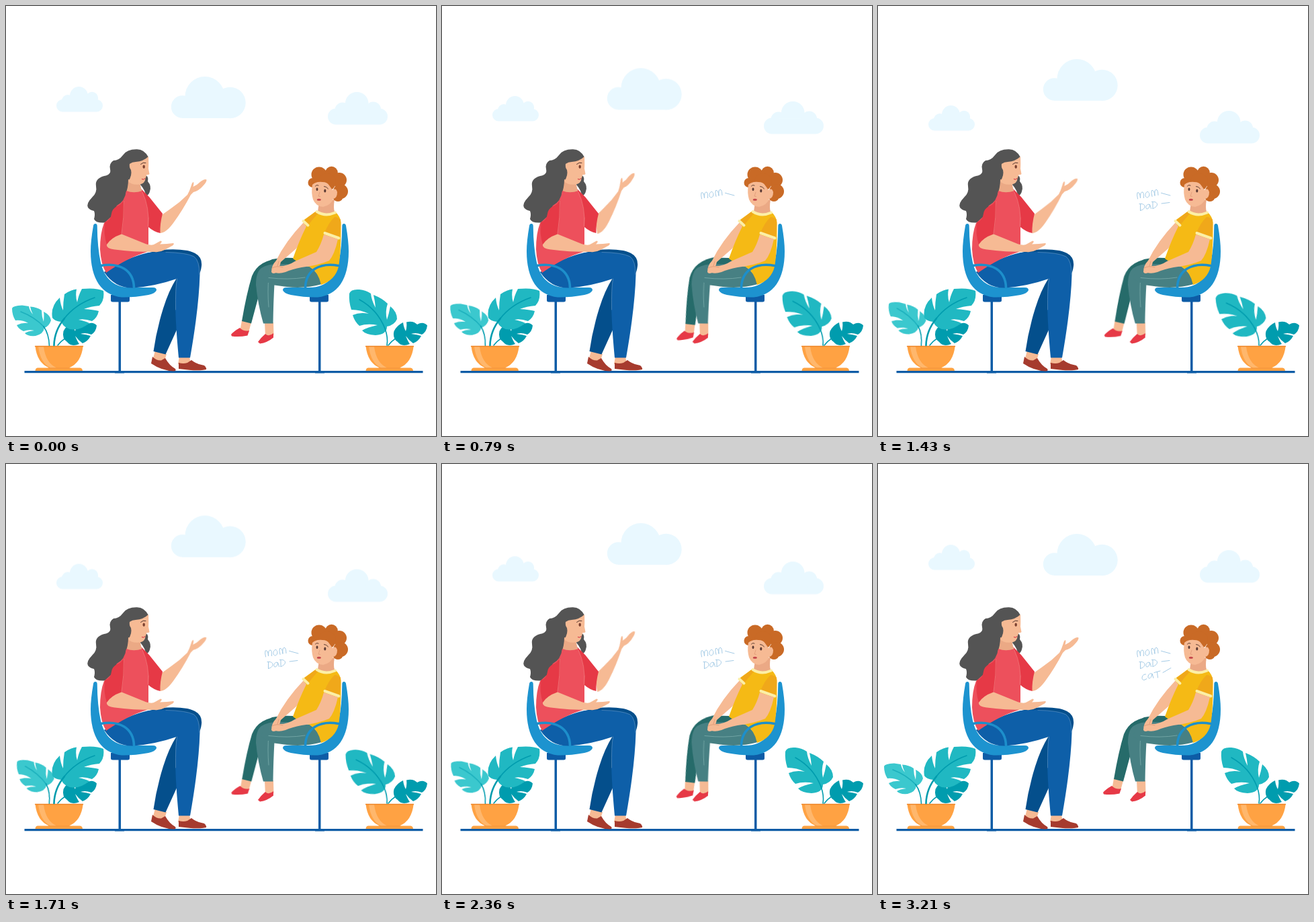
Animation of 640x640 px, one loop 3280 ms. Source, as an HTML page without scripts:

```html
<!DOCTYPE html>
<html lang="en">
<head>
<meta charset="utf-8">
<title>Talking together</title>
<style>
html, body { margin: 0; height: 100%; overflow: hidden; background: #fff; }
svg { display: block; width: 100vw; height: 100vh; }

.sink, .rise, .arm, .shin, .foot, .sway, .bend, .word {
  animation: 3280ms linear infinite;
}
.sink { animation-name: sink; }
.rise { animation-name: rise; }
.sway { animation-name: sway; transform-origin: 65px 505px; }
.bend { animation-name: bend; transform-origin: 567px 505px; }
.arm, .shin, .foot {
  animation-name: swing;
  animation-timing-function: cubic-bezier(.37, 0, .63, 1);
}
.arm { --a: -9.6deg; transform-origin: 236px 325px; }
.shin { --a: -7.6deg; transform-origin: 388px 385px; }
.foot { --a: 1.2deg; transform-origin: 386px 390px; }
.word { animation-timing-function: step-end; }
.w1 { animation-name: w1; }
.w2 { animation-name: w2; }
.w3 { animation-name: w3; }

@keyframes sink {
  0%, 100% { transform: translateY(0); }
  8.7% { transform: translateY(1.5px); }
  17.4% { transform: translateY(6px); }
  25% { transform: translateY(15px); }
  32.6% { transform: translateY(23px); }
  43.6% { transform: translateY(28px); }
  51.2% { transform: translateY(29px); }
  61% { transform: translateY(25px); }
  85.1% { transform: translateY(8px); }
  97.9% { transform: translateY(.2px); }
}
@keyframes rise {
  0%, 100% { transform: translateY(0); }
  17.4% { transform: translateY(-8px); }
  32.6% { transform: translateY(-18.3px); }
  43.6% { transform: translateY(-26px); }
  51.2%, 53.5% { transform: translateY(-28.3px); }
  61% { transform: translateY(-24px); }
  72% { transform: translateY(-17px); }
  85.1% { transform: translateY(-8px); }
  97.9% { transform: translateY(-1px); }
}
@keyframes swing {
  0%, 49.5%, 97.9%, 100% { transform: rotate(0); }
  24.7%, 75% { transform: rotate(var(--a)); }
}
@keyframes sway {
  0%, 97.9%, 100% { transform: rotate(0); }
  17.4% { transform: rotate(1.7deg); }
  32.6% { transform: rotate(5.6deg); }
  43.6%, 61% { transform: rotate(7deg); }
  51.2% { transform: rotate(7.3deg); }
  72% { transform: rotate(4.5deg); }
  85.1% { transform: rotate(1.6deg); }
}
@keyframes bend {
  0%, 66%, 100% { transform: rotate(0); }
  17.4% { transform: rotate(-1.6deg); }
  32.6% { transform: rotate(-5.5deg); }
  43.6%, 46% { transform: rotate(-6.6deg); }
  61% { transform: rotate(-.9deg); }
}
@keyframes w1 { 0% { opacity: 0; } 8.5%, 100% { opacity: 1; } }
@keyframes w2 { 0% { opacity: 0; } 38.4%, 100% { opacity: 1; } }
@keyframes w3 { 0% { opacity: 0; } 72.6%, 100% { opacity: 1; } }

.sky { fill: #e9f8ff; }
.skin { fill: #f6ba94; }
.neck { fill: #eba985; }
.hair { fill: #545454; }
.chair { fill: #1d93cf; }
.navy { fill: #0d5ca6; }
.red { fill: #ed505c; }
.crimson { fill: #e63946; }
.denim { fill: #0e5fa8; }
.shade { fill: #044f8c; }
.brown { fill: #a63b2e; }
.ginger { fill: #c96a26; }
.yellow { fill: #f5ba15; }
.amber { fill: #f0a81a; }
.moss { fill: #478083; }
.pine { fill: #266b6a; }
.leaf { fill: #20b8c2; }
.mint { fill: #3bc8ce; }
.teal { fill: #009cae; }
.line { fill: none; stroke-linecap: round; stroke-linejoin: round; }
.stem { stroke: #009cae; stroke-width: 1.6; }
.ink { stroke: #a3cae5; stroke-width: 1; }
.face { stroke: #5a3a30; stroke-width: 1; }
</style>
</head>
<body>
<svg viewBox="0 0 640 640">
  <defs>
    <g id="cloud" class="sky">
      <rect y="19" width="69" height="18.5" rx="9.2"/>
      <circle cx="17" cy="21" r="9"/>
      <circle cx="33.5" cy="13.5" r="13.5"/>
      <rect x="17" y="20" width="36" height="14"/>
    </g>
    <g id="seat">
      <path class="navy" d="M156 430H184V438Q184 440.500 181 440.500H159Q156 440.500 156 438ZM167.500 438H171V544H167.500ZM162 543H176V546.600H162Z"/>
      <path class="chair" d="M130 327Q130.500 324 133 324Q135.500 324 135.700 327Q136 360 141 382Q147 408 167 416Q174 419 185 419H219Q224 419 224 423Q222 428 212 430Q190 434 172 433.500Q150 431 138 414Q126 396 126 365Q126 350 130 327Z"/>
    </g>
    <path id="rest" class="line" stroke="#1d8fcb" stroke-width="3.6" d="M141 386.500Q162 382.500 176 391Q190 400 190.500 419"/>
    <g id="pot">
      <path class="line stem" d="M77 505Q86 493 104 487Q118 480 130 476"/>
      <path class="teal" d="M135 475.500Q134 485 127 489Q118 485.500 111 488Q120 489 126 491Q122 499 114 502Q107 497 103 491Q106 499 109 503Q97 508 91 500Q83 495 85.500 484Q90 475 99 471Q100 479 103 484Q105 477 104 470.500Q114 468 120 474Q129 469 135 475.500Z"/>
      <path fill="#ffa243" d="M43.500 506H114.700Q112 531 94 538.500H110Q114 539 114 543.500H43.500Q43.500 539 47 538.500H64Q46 531 43.500 506Z"/>
      <path fill="#ffb76c" d="M48 507H56Q59 531 75 538.500H66Q51 531 48 507Z"/>
      <path class="line" stroke="#ee8425" stroke-width="1.300" d="M43.500 506.500H114.500"/>
      <path class="line" stroke="#f39035" stroke-width=".8" d="M63 539H95"/>
    </g>
  </defs>

  <!-- sky -->
  <g class="sink sky">
    <use href="#cloud" x="75" y="120"/>
    <circle cx="128" cy="137" r="9.200"/>
    <use href="#cloud" transform="translate(479 128) scale(1.29)"/>
    <circle cx="546.500" cy="154" r="11.500"/>
  </g>
  <g class="rise sky">
    <circle cx="262.500" cy="150" r="16.700"/>
    <circle cx="296" cy="134.500" r="29.500"/>
    <circle cx="333.500" cy="144" r="23.200"/>
    <rect x="262" y="138" width="72" height="29"/>
  </g>

  <!-- plants -->
  <g class="sway">
    <path class="mint" d="M9 450Q10 446 24 445.500L34 447Q35 453 40 459Q37 453 36 447.500Q46 448 53 453Q53 462 56 470Q57 460 56 455Q66 460 67 468Q64 477 57 479Q56 488 44 491Q32 492 28 487Q32 484 42 483Q34 481 26 484Q19 481 16 475Q24 471 33 472Q24 467 14 468Q9 460 9 450Z"/>
    <path class="line stem" stroke-opacity=".55" d="M22 455Q43 463 57 478"/>
    <path class="line stem" d="M56 477Q64 488 64.500 506"/>
  </g>
  <use href="#pot"/>
  <path class="leaf" d="M145 424Q147 438 139 446Q126 447 116 451Q130 452 138 454Q136 464 128 469Q116 465 108 467Q118 469 124 472Q112 482 100 481.500Q87 481 82 470Q72 469 69 464Q66 447 80 434Q81 445 85 453Q85 440 87 429Q97 422 105 421.500Q103 432 106 441Q108 430 113 421Q135 419 145 424Z"/>
  <path class="line stem" d="M132 434Q103 444 86 466"/>
  <path class="line stem" style="stroke-width:2.600" d="M87 465Q72 483 71.500 505"/>
  <use href="#pot" x="492"/>
  <g class="bend">
    <path class="leaf" d="M511 428Q513 421 526 422Q536 423 543 428Q544 438 550 449Q549 438 547 430Q560 435 568 443Q564 455 567 467Q570 458 572 447Q582 455 582 466Q578 475 567 477Q567 489 550 490Q535 489 530 483Q538 478 553 475Q538 472 526 476Q519 470 516 460Q527 455 540 458Q528 452 514 452Q510 440 511 428Z"/>
    <path class="line stem" d="M526 437Q553 452 564 480Q569 494 567 505"/>
  </g>

  <!-- floor and chairs -->
  <rect class="navy" x="27.500" y="543" width="593" height="3.200"/>
  <use href="#seat"/>
  <use href="#seat" transform="matrix(-1 0 0 1 636 0)"/>

  <!-- mother -->
  <g>
    <path class="skin" d="M222 513L239 518L235 531L218 528Z"/>
    <path class="brown" d="M218 522Q224 528 231 527.500L237 524Q243 535 252 540Q254 543 250 543.500Q232 543 216 532Z"/>
    <path class="shade" d="M210 368Q240 359 270 364Q293 369 291 387Q290 396 286 402L262 440L255 480L237.500 518.500L219.500 514Q224 482 234 450Q242 424 254 405Z"/>
    <path class="skin" d="M258 522H273L275 533H256Z"/>
    <path class="brown" d="M257 531Q264 533 270 531L276 527Q283 533 295 535Q299 538 298 541Q290 543 275 542L257 540Z"/>
    <path class="denim" d="M146 396Q180 374 212 367Q255 364 277 371Q289 376 288.500 400Q287 450 274 523.500H257Q252 470 252 440Q252 420 254 406Q222 417 190 419.500Q163 421 146 396Z"/>
    <path class="line" stroke="#6796c0" stroke-width=".6" d="M238 366.500Q268 367 280 373Q288 379 288 400M252.500 452Q252 420 254.500 406"/>

    <path class="hair" d="M212 225Q206 213.500 195 213.300Q180 213 174 222Q168 230 160 230Q153 234 155 243Q157 251 146 253Q132 257 134 268Q136 278 128 285Q119 294 122 300Q125 304 131 305Q133 310 131 317Q133 323 146 322.500L160 318L170 302L182 290L192 262V240Z"/>
    <path class="neck" d="M182 258L199 262L203 280H178Q182 270 182 258Z"/>
    <path class="hair" d="M205 251Q213 252 211 261Q217 268 214 276Q213 281 208 283.500Q208 275 200 266Z"/>
    <path class="skin" d="M184 235Q188 232 193 232Q205 231 212 224Q212.500 236 212 242L213.500 250Q212 252 209.500 251L207.500 257Q207 264 199 265.500Q187 267 182 261Q188 252 186 244Q183 240 184 235Z"/>
    <ellipse cx="205.200" cy="239.200" rx="1.700" ry="2.700" fill="#7a4030"/>
    <path class="line face" d="M200.500 235.500Q204 232 208 233.500"/>
    <path class="line" stroke="#d8434c" stroke-width="1.200" d="M202.500 257.500Q205 259 207 256.500"/>

    <g class="arm">
      <path class="skin" d="M229 313Q245 302 258 292L270 281Q273 276 275.500 268Q277 262 279 262Q280 264 278.500 269Q285 266 290 261Q296 257 298.500 258.500Q299 262 293 268Q287 275 279 277L275 281Q263 304 249 323Q238 338 229 338Z"/>
    </g>
    <path class="red" d="M179 275Q190 279.500 203 275Q212 285 212 300V354L210 366Q182 374 149 397Q141 384 140 362Q140 338 146 323L156 314L165 297Q177 291 179 275Z"/>
    <path class="crimson" d="M201 272L213 284L233 309Q229 324 229.500 338Q220 336 212 329Q214 300 201 272Z"/>
    <path class="crimson" d="M176 288Q177 310 172 340Q158 345 150 355Q145 340 147 322Q156 319 157 309Q158 302 165 298Q172 296 176 288Z"/>
    <path class="line" stroke="#f18a8a" stroke-width=".6" d="M175.500 290Q176 314 172 339M203 277Q214 300 211.500 328"/>
    <path class="skin" d="M150 355Q156 345 172 339.500L209 354.500Q218 357 222 354L230 349.500Q234 350 229 354.500Q240 354 249 353Q251 354 248 356.500L236 363Q229 367 221 366Q188 366 162 362.500Q149 361 150 355Z"/>
  </g>
  <use href="#rest"/>

  <!-- boy -->
  <g class="shin">
    <path class="skin" d="M351 468L365 471L361 486L348 485Z"/>
    <path class="crimson" d="M335 489Q339 484 348 479Q354 485 362 483L359.500 490.500Q347 493 336 491.500Z"/>
    <path class="pine" d="M410 376Q376 377 366 402Q358 428 351 469L365 472.500L377 428L395 400Z"/>
  </g>
  <path class="pine" d="M396 377Q415 373 436 376L446 390L385 402L378 388Z"/>
  <g class="foot">
    <path class="skin" d="M385 471H398L398.500 490L386 491Z"/>
    <path class="crimson" d="M375 500Q380 493 386 488Q391 493 398 487L398 493.500Q389 501 378 502.500Z"/>
    <path class="moss" d="M430 386Q396 380 380 390Q372 396 372 415Q375 445 383 472.500H397.500Q398 440 399.500 414L430 400Z"/>
    <path class="line" stroke="#83b3b2" stroke-width=".7" d="M391 448Q389 425 391 404"/>
  </g>
  <path class="moss" d="M384 389Q410 380 452 388Q466 397 470 414Q445 421 418 418L396 415L380 406Z"/>
  <path class="line" stroke="#83b3b2" stroke-width=".7" d="M391 404.500Q420 408 445 404"/>

  <path class="skin" d="M443 322L450 328Q441 350 432 361L409 381Q407 390 404 396Q397 400 395 396Q395 386 402 379Q416 350 443 322Z"/>
  <path class="yellow" d="M462 305L444 318Q441 322 447 328Q436 350 427 376Q440 386 452 388Q465 396 469 415Q490 408 495 388Q499 365 498.500 322Q498 314 490 306Z"/>
  <path class="amber" d="M462 305L444 319L449 327Q456 318 464 309Z"/>
  <path class="amber" d="M489 314Q479 324 474 338L496 345Q499 330 498 318Q494 314 489 314Z"/>
  <path class="line" stroke="#fcefa6" stroke-width="4" stroke-linecap="butt" d="M442.500 320L449.500 326.500M474.500 338L495.500 345.500"/>
  <path class="neck" d="M466 292L489 288Q487 300 489 306Q476 314 464 306Z"/>
  <path class="line" stroke="#fcefa6" stroke-width="4" d="M462.500 306Q475 314 490 307.500"/>
  <path class="skin" d="M473 340L494 347Q489 370 481 379Q465 386 440 389Q425 392 416 396Q407 399 401 397L396 394Q398 386 404 387Q418 388 430 380L462 366Q469 355 473 340Z"/>
  <path class="line" stroke="#d99370" stroke-width=".7" d="M396 390Q403 386 412 389M404 387L406 380"/>

  <g class="ginger">
    <circle cx="466" cy="251" r="11.500"/>
    <circle cx="484.500" cy="248" r="9.300"/>
    <circle cx="496" cy="259" r="11"/>
    <circle cx="498" cy="276" r="11"/>
    <circle cx="494" cy="283" r="8"/>
    <circle cx="456.500" cy="263" r="7"/>
    <circle cx="478" cy="262" r="13"/>
  </g>
  <path class="skin" d="M456 266Q462 261 471 262Q478 262 481 267L486 274Q491 270 493 277Q493 286 487 287Q484 296 472 299Q461 298 457 288Q454 278 456 266Z"/>
  <path class="line" stroke="#dc9672" stroke-width=".7" d="M467 277L465 283L467.500 283.500"/>
  <g fill="#5b3b35">
    <ellipse cx="463" cy="272.800" rx="1.500" ry="2.400"/>
    <ellipse cx="474.800" cy="275" rx="1.600" ry="2.500"/>
  </g>
  <path class="line face" d="M460.500 268Q462 265.500 465 267M473.500 268.500Q477 268.500 479.500 272"/>
  <ellipse cx="465.800" cy="288.300" rx="3" ry="1.500" fill="#c4464a"/>
  <use href="#rest" transform="matrix(-1 0 0 1 636 0)"/>

  <!-- spoken words, handwritten -->
  <g class="line ink">
    <g class="word w1" role="img" aria-label="mom">
      <path d="M386.500 287Q385 281 386 278Q390 276 390.500 286Q390 276 394 277Q396 279 395.500 285.500M401 276.500C397 277 397 285 400.500 285C405 285 405 276 401 276.500M408 283.500Q406 278 407.500 274.500Q411 273 412 282.500Q411 272 415 273.500Q417 275 417 281.500"/>
      <path d="M421.500 278.300L435 282"/>
    </g>
    <g class="word w2" role="img" aria-label="DAD">
      <path d="M390.500 295V304.500M389 294.500C399 293 400 302 390.500 304.500M404 295.500C400 293 397 301 400 302Q404 302 404.500 295.500L406.500 301.500M409 292V301.500M407.500 291.500C418 290 418 299 409 301.500"/>
      <path d="M422 294L434 292.500"/>
    </g>
    <g class="word w3" role="img" aria-label="CAT">
      <path d="M398.500 313C393 312 391 321 395.500 321.500Q398 321.500 400 319.500M407.500 312C403 310 400 318 403.500 319Q407 319 408 312L410 318.500M411 310.500L420 308M415.500 309.500L416.500 318"/>
      <path d="M424 310.500L436 303.500"/>
    </g>
  </g>
</svg>
</body>
</html>
```
